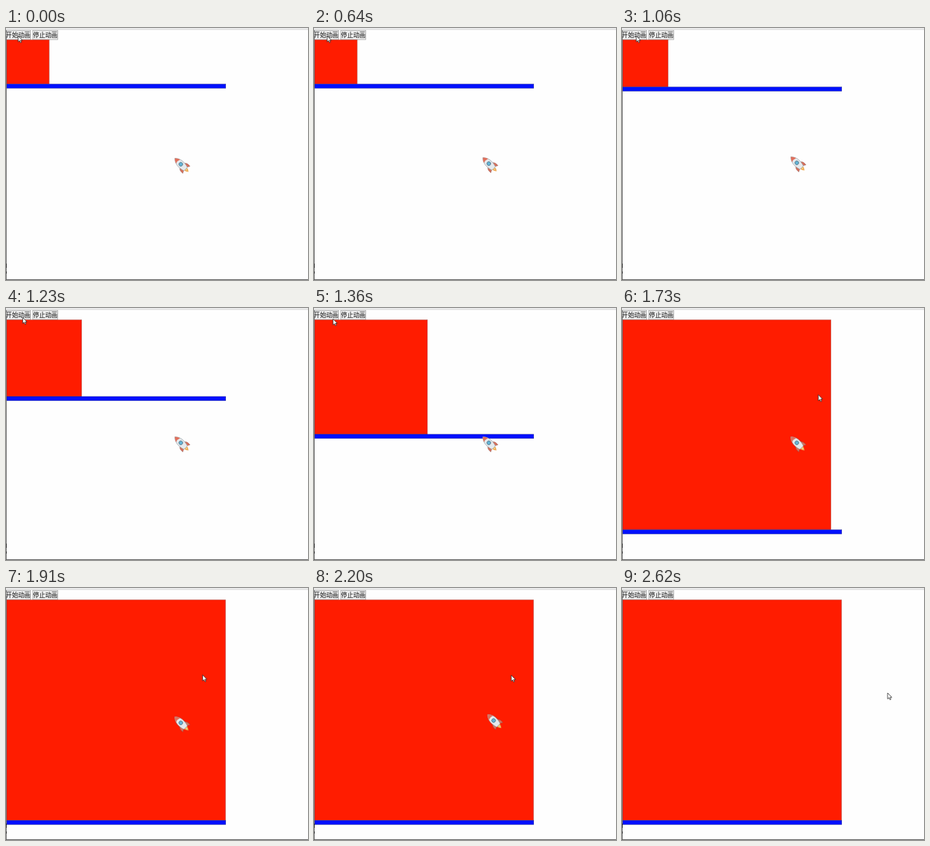
These frames come from a looping animation (423 px wide and 353 px high, 3060 ms). An HTML page:

```html
<!DOCTYPE html>
<html lang="zh">
<head>
<meta charset="utf-8">
<style>
html, body { margin: 0; width: 100%; height: 100%; overflow: hidden; background: #fefefe; }
svg { display: block; width: 100vw; height: 100vh; }
text { font: 8.6px "Noto Sans CJK SC", "Noto Sans CJK", sans-serif; fill: #111; text-anchor: middle; }
</style>
</head>
<body>
<svg viewBox="0 0 423 353">
  <rect width="423" height="353" fill="#fefefe"/>
  <g stroke="#a9a9a9" stroke-width=".8" fill="#ededed">
    <rect x="-1.6" y="3.4" width="36" height="12.8"/>
    <rect x="37.4" y="3.4" width="35" height="12.8"/>
  </g>
  <text x="17" y="13">开始动画</text>
  <text x="55" y="13">停止动画</text>

  <rect id="box" x="1" y="16.6" fill="#ff1c00" stroke="#551818" stroke-opacity=".5" stroke-width=".5"/>
  <rect id="bar" x="1" width="306.8" height="5.9" fill="#0010ff" stroke="#101050" stroke-opacity=".6" stroke-width=".5"/>

  <!-- drawn nose up, then turned to the upper left -->
  <g id="rocket">
    <g transform="rotate(-45)">
      <path d="M-2.6 8 Q-2.6 11 0 13.6 Q2.6 11 2.6 8Z" fill="#eda750"/>
      <path d="M-1.2 8 Q-1.2 10 0 11.4 Q1.2 10 1.2 8Z" fill="#f6d384"/>
      <path d="M-4 1 Q-8 3 -7 9.4 L-3 7Z M4 1 Q8 3 7 9.4 L3 7Z" fill="#d9705c" stroke="#8d5750" stroke-width=".5"/>
      <path d="M0 -13.4 C5.6 -8 6 0 3.4 8 H-3.4 C-6 0 -5.6 -8 0 -13.4Z" fill="#e6eaed" stroke="#8b969c" stroke-width=".6"/>
      <path d="M0 -13.4 Q3.2 -10.5 4 -7 Q0 -8.6 -4 -7 Q-3.2 -10.5 0 -13.4Z" fill="#e0705c"/>
      <circle cy="-1.6" r="2.7" fill="#64b4d6" stroke="#587888" stroke-width=".8"/>
    </g>
  </g>

  <path d="M0 0H423V2.2H0Z" fill="#f1f1f1"/>
  <path d="M0 2H423" stroke="#c9c9c9" stroke-width=".8"/>
  <path d="M.5 3V353" stroke="#777"/>
  <path d="M.4 330V336M.4 341V344" stroke="#222"/>
  <path d="M0 352.4H423" stroke="#555"/>

  <path id="cursor" d="M0 0V8.4L2 6.7 3.3 9.6 4.7 9 3.4 6.2H6Z" fill="#fff" stroke="#222" stroke-width=".75"/>
</svg>
<script>
const LOOP = 3060;
const $ = id => document.getElementById(id);
const [box, bar, rocket, cursor] = ['box', 'bar', 'rocket', 'cursor'].map($);

// Keys are [time, ...values]
const progress = [[1000, 0], [1060, .081], [1360, .434], [1530, .563], [1730, .841], [1850, 1]];
const pointer = [[430, 17, 11], [900, 20, 11], [1060, 20, 11], [1360, 26, 15], [1410, 60, 29],
  [1530, 232, 95], [1640, 268, 117], [1730, 275, 121.5], [2200, 276, 122], [2340, 310, 131],
  [2500, 360, 144], [2620, 372, 147]];
const flight = [[430, 246, 192], [900, 246, 190], [2120, 246, 190], [2200, 253, 187],
  [2260, 235, 172], [2480, -20, -20]];

function sample(keys, t) {
  const i = keys.findIndex(k => k[0] > t);
  if (i < 0) return keys[keys.length - 1].slice(1);
  if (i === 0) return keys[0].slice(1);
  const a = keys[i - 1], b = keys[i], u = (t - a[0]) / (b[0] - a[0]);
  return a.slice(1).map((v, j) => v + (b[j + 1] - v) * u);
}

const place = (el, [x, y]) => el.setAttribute('transform', `translate(${x} ${y})`);

function draw(t) {
  const swing = .5 - Math.cos(Math.PI * sample(progress, t)[0]) / 2;
  const grow = 247 * swing;
  box.setAttribute('width', 59.5 + grow);
  box.setAttribute('height', 61.8 + grow);
  bar.setAttribute('y', 78.5 + grow);
  place(rocket, sample(flight, t));
  place(cursor, sample(pointer, t));
}

const start = performance.now();
function tick() {
  draw((performance.now() - start) % LOOP);
  requestAnimationFrame(tick);
}
tick();
</script>
</body>
</html>
```
